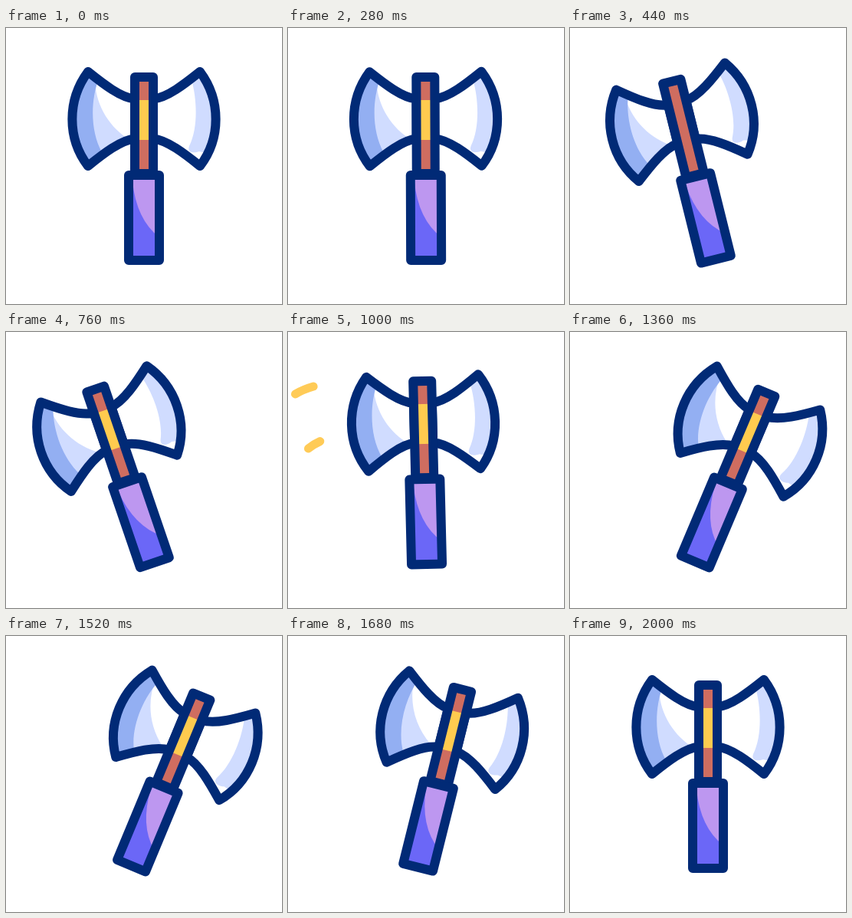
An HTML page that plays this animation: 360 px wide and 360 px high, repeating every 2.2 s.

```html
<!DOCTYPE html>
<html lang="en">
<head>
<meta charset="utf-8">
<title>Swinging axe</title>
<style>
  html, body { margin: 0; width: 100%; height: 100%; overflow: hidden; background: #fff; }
  svg { display: block; width: 100vw; height: 100vh; }
  .line { fill: none; stroke: #012a76; stroke-width: 12; stroke-linejoin: round; stroke-linecap: round; }
  .trail { fill: none; stroke: #ffcb57; stroke-width: 11; stroke-linecap: round; }
</style>
</head>
<body>
<svg viewBox="0 0 360 360">
  <defs>
    <path id="blade" d="M168 92.500C150 91 127 73 107 57C79.500 94 79.500 144 107 180C127 164 150 146 168 144.500Z"/>
    <clipPath id="bladeClip"><use href="#blade"/></clipPath>
  </defs>
  <path class="trail" d="M9.500 81Q22 73.500 41 69"/>
  <path class="trail" d="M26.500 152Q35 145 47 140.500"/>
  <g id="axe">
    <g>
      <use href="#blade" fill="#fff"/>
      <g clip-path="url(#bladeClip)">
        <path fill="#d0dcff" d="M116 66C116 97 132 126 157 143L110 190L70 118L107 50Z"/>
        <path fill="#93aff2" d="M121 66C110 95 110 135 125 162L107 190L70 118L107 50Z"/>
      </g>
      <use href="#blade" class="line"/>
    </g>
    <g transform="translate(360 0) scale(-1 1)">
      <use href="#blade" fill="#fff"/>
      <path clip-path="url(#bladeClip)" fill="#d0dcff"
        d="M118 68C111 92 109 130 121 154C124 162 116 164 108 161L90 165L70 118L107 50Z"/>
      <use href="#blade" class="line"/>
    </g>
    <path fill="#cf6d60" d="M168 64H192V190H168Z"/>
    <path id="band" fill="#ffcb4f" d="M168 94H192V146H168Z"/>
    <path class="line" d="M168 64H192V190H168Z"/>
    <path fill="#6b67f7" d="M160 192H200V303H160Z"/>
    <path fill="#bd97f0" d="M165 192H200V273Q170 250 165 200Z"/>
    <path class="line" d="M160 192H200V303H160Z"/>
  </g>
</svg>
<script>
  const LOOP = 2200, STEP = 40;
  const axe = document.getElementById('axe');
  const band = document.getElementById('band');
  const trails = [...document.querySelectorAll('.trail')];
  const lengths = trails.map(path => path.getTotalLength());

  // Swing keys: time in ms, angle in degrees
  const swing = [[0, 0], [200, 0], [620, -19.1], [635, -19.1], [1397, 22.9], [2000, 0], [LOOP, 0]];

  const clamp = x => Math.min(1, Math.max(0, x));
  const progress = (t, from, to) => clamp((t - from) / (to - from));
  const easeInOut = x => x < 0.5 ? 8 * x ** 4 : 1 - 8 * (1 - x) ** 4;

  function angleAt(t) {
    const i = swing.findIndex(([end]) => t < end);
    const [t0, a0] = swing[i - 1], [t1, a1] = swing[i];
    return a0 + (a1 - a0) * easeInOut(progress(t, t0, t1));
  }

  function drawTrail(path, length, t) {
    const head = progress(t, 900, 1030) * length;
    const tail = progress(t, 1000, 1140) * length;
    path.style.display = head > tail ? '' : 'none';
    path.setAttribute('stroke-dasharray', `${head - tail} ${length * 2}`);
    path.setAttribute('stroke-dashoffset', -tail);
  }

  function render(time) {
    const t = Math.floor((time % LOOP) / STEP) * STEP;
    axe.setAttribute('transform', `rotate(${angleAt(t)} 180 260)`);
    band.style.display = t >= 400 && t <= 480 ? 'none' : '';
    trails.forEach((path, i) => drawTrail(path, lengths[i], t));
  }

  const start = performance.now();
  function tick() {
    render(performance.now() - start);
    requestAnimationFrame(tick);
  }
  tick();
</script>
</body>
</html>
```
